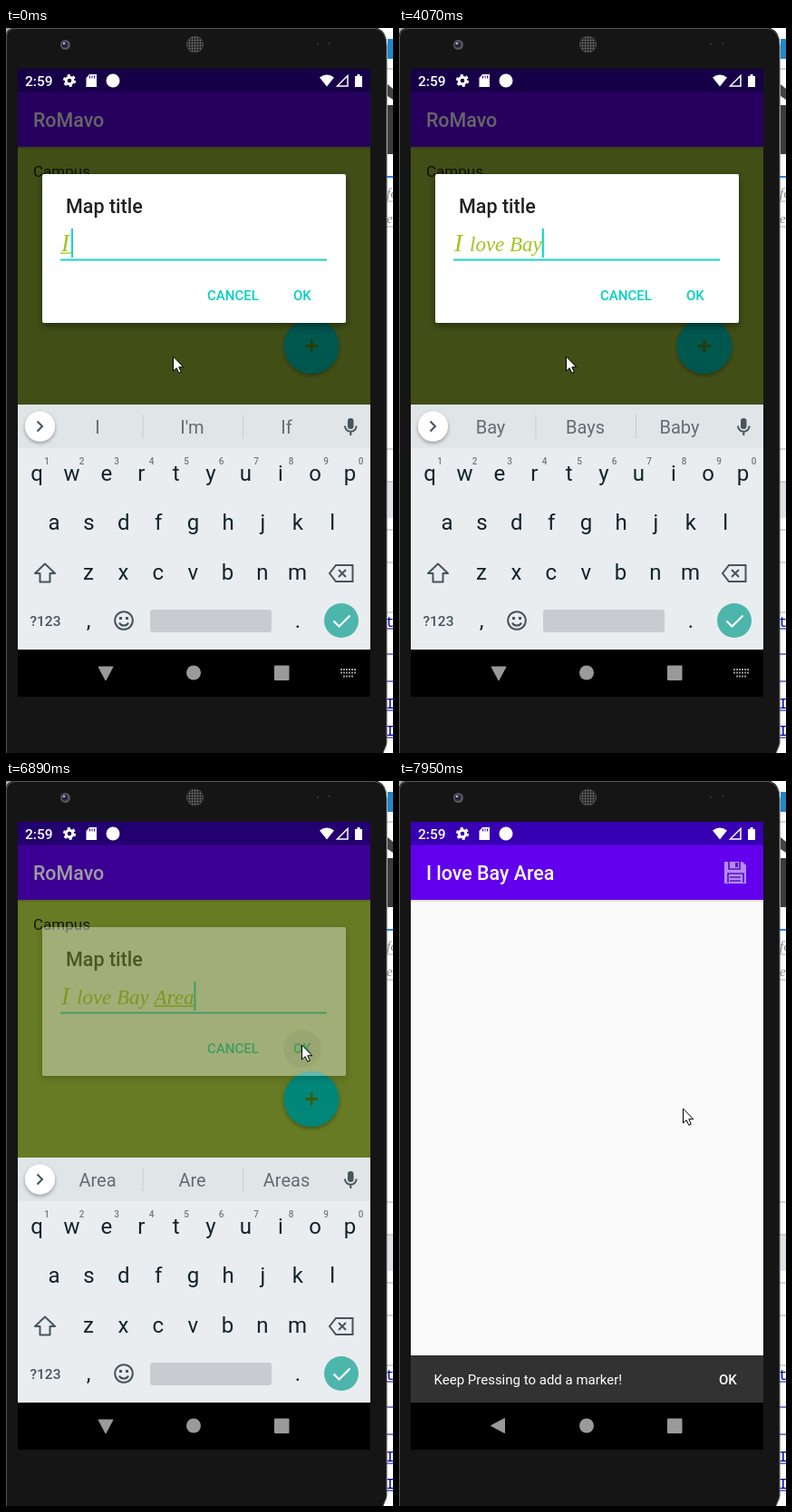
An HTML page that plays this animation: 427x799 px, repeating every 8 s.

```html
<!DOCTYPE html>
<html lang="en">
<head>
<meta charset="utf-8">
<style>
  html, body { margin: 0; width: 100%; height: 100%; overflow: hidden; background: #fff; }
  svg { display: block; font-family: Roboto, sans-serif; }
  .med { font-weight: 500; }
  .bar { font-size: 21.4px; font-weight: 500; fill: #fff; }
  .btn { font-size: 15px; font-weight: 500; }
  .mid { text-anchor: middle; }
  .key { font-size: 24px; fill: #13232b; text-anchor: middle; }
  .num { font-size: 10px; font-weight: 500; fill: #727b80; text-anchor: middle; }
  .sug { font-size: 20px; fill: #626c72; text-anchor: middle; }
  .script { font: italic 23px "Liberation Serif", serif; fill: #a0c51e; }
  .line { fill: none; stroke: #46545c; stroke-width: 2; }
</style>
</head>
<body>
<svg width="427" height="799" viewBox="0 0 427 799">
  <defs>
    <pattern id="mesh" width="3" height="3" patternUnits="userSpaceOnUse">
      <rect width="3" height="3" fill="#222"/><circle cx="1.5" cy="1.5" r="1" fill="#777"/>
    </pattern>
    <filter id="soft" x="-20%" y="-20%" width="140%" height="150%">
      <feDropShadow dx="0" dy="3" stdDeviation="4" flood-opacity=".45"/>
    </filter>
    <filter id="lift" x="-20%" y="-20%" width="140%" height="150%">
      <feDropShadow dx="0" dy="2" stdDeviation="2" flood-opacity=".35"/>
    </filter>
    <clipPath id="screen"><rect x="13" y="45" width="389" height="640"/></clipPath>
  </defs>

  <!-- window behind the phone -->
  <g id="desk">
    <rect x="421" y="12" width="6" height="22" fill="#2088c8"/>
    <path d="M421 62l6 5v12l-6-4z" fill="#444"/>
    <rect x="421" y="85" width="6" height="54" fill="#3b3b3d"/>
    <path d="M420 164h7" stroke="#2c86e8" stroke-width="2"/>
    <rect x="421" y="500" width="6" height="40" fill="#dfe2e8"/>
    <path d="M420 45h7m-7 146h7m-7 28h7m-7 245h7m-7 36h7m-7 53h7m-7 36h7m-7 55h7" stroke="#aaa"/>
    <g font-family="Liberation Serif, serif" font-style="italic" font-size="15" fill="#888">
      <text x="420" y="187">fe</text><text x="420" y="215">er</text>
    </g>
    <g font-family="Liberation Mono, monospace" font-size="16" fill="#00a">
      <text x="419" y="660">t</text><text x="419" y="750">I</text><text x="419" y="780">I</text>
    </g>
    <path d="M420 662h7m-7 28h7m-7 30h7m-7 32h7m-7 30h7" stroke="#00a"/>
  </g>

  <!-- phone body -->
  <path d="M0 0H410Q420 4 420 18V790L416 799H0z" fill="#151515"/>
  <path d="M.5 799V10Q1 .5 12 .5H407Q420 3 420 20V788L416 799" fill="none" stroke="#555"/>
  <path d="M0 0h7Q0 2 0 9z" fill="#aaa"/>
  <circle cx="65.500" cy="18.500" r="5.500" fill="#55555b"/>
  <circle cx="65" cy="18.500" r="3.200" fill="#26243c"/><circle cx="64" cy="17" r="1.300" fill="#b9b9cc"/>
  <circle cx="208.500" cy="18" r="9.500" fill="url(#mesh)"/>
  <path d="M343 18h2m11-1h2" stroke="#333" stroke-width="2"/>
  <rect x="13" y="45" width="389" height="692"/>

  <!-- list screen -->
  <g clip-path="url(#screen)">
    <rect x="13" y="45" width="389" height="640" fill="#fafafa"/>
    <rect x="13" y="131" width="389" height="284" fill="#a4c639"/>
    <rect x="13" y="131" width="389" height="2" opacity=".12"/>
    <rect x="13" y="45" width="389" height="26" fill="#3700b3"/>
    <rect x="13" y="70.500" width="389" height="60.500" fill="#6200ee"/>
    <text class="bar" x="30" y="109">RoMavo</text>
    <text x="30" y="163.500" font-size="17" fill="#20260c">Campus</text>
    <g filter="url(#lift)"><circle cx="337" cy="350.500" r="30.500" fill="#03dac5"/></g>
    <path d="M330 350.500h14m-7-7v14" stroke="#5c941c" stroke-width="3"/>
    <rect id="scrim" x="13" y="45" width="389" height="640"/>

    <g id="dialog">
      <rect x="40" y="161" width="335" height="164" rx="2" fill="#fff" filter="url(#soft)"/>
      <circle id="ripple" cx="327" cy="295" r="21" opacity=".08"/>
      <text class="med" x="66" y="203.500" font-size="21.500" fill="#212121">Map title</text>
      <text class="script" id="first" x="61" y="246" style="font-size:27px">I</text>
      <text class="script" id="rest" x="78" y="245.500"></text>
      <path id="under" stroke="#a0c51e" stroke-width="1.300"/>
      <path d="M60 255.500H354" stroke="#1fcfc4" stroke-width="2"/>
      <rect id="caret" y="221" width="2" height="32" fill="#03dac5"/>
      <g class="btn" fill="#03d0c0"><text x="222" y="300">CANCEL</text><text x="317" y="300">OK</text></g>
    </g>

    <g id="board">
      <rect x="13" y="415" width="389" height="270" fill="#e9edf0"/>
      <rect x="13" y="415" width="389" height="48" fill="#e0e5e8"/>
      <path d="M151 426v26m110.500-26v26" stroke="#c6cccf"/>
      <circle cx="37.500" cy="439" r="16.500" fill="#fff" filter="url(#lift)"/>
      <path class="line" d="M34.500 433.500l5.500 5.500-5.500 5.500"/>
      <rect x="377" y="430" width="6.500" height="12" rx="3.200" fill="#46545c"/>
      <path class="line" d="M374 438.500a6.300 6.300 0 0 0 12.600 0M380.300 445v4" stroke-width="1.700"/>
      <g id="keys"></g>
      <path id="shift" class="line" d="M43 590.500L54 601h-5.500v9.500h-11V601H32z" stroke-linejoin="round"/>
      <path class="line" d="M364 592h18.500v18H364l-7-9zM367 597l8 8m0-8l-8 8"/>
      <text class="med mid" x="43.500" y="659" font-size="15.500" fill="#46545c">?123</text>
      <text class="key" x="91" y="661">,</text>
      <text class="key" x="322" y="661">.</text>
      <circle class="line" cx="130" cy="653" r="9.800"/>
      <path class="line" d="M125 655.500a5.300 4.500 0 0 0 10 0"/>
      <path d="M125 650.500h3m4 0h3" stroke="#46545c" stroke-width="3"/>
      <rect x="159" y="641" width="134" height="25" rx="3" fill="#c8ccd1"/>
      <circle cx="370" cy="653" r="19" fill="#4db6ac"/>
      <path d="M361.500 653.500l6 6 12-12" fill="none" stroke="#fff" stroke-width="2.200"/>
    </g>
  </g>

  <!-- map screen -->
  <g id="map">
    <rect x="13" y="45" width="389" height="26" fill="#3700b3"/>
    <rect x="13" y="131" width="389" height="554" fill="#fafafa"/>
    <rect x="13" y="131" width="389" height="2" opacity=".1"/>
    <rect x="13" y="70.500" width="389" height="60.500" fill="#6200ee"/>
    <text class="bar" x="30" y="109">I love Bay Area</text>
    <path d="M359 89h20l4 4v20h-24z" fill="#b58cf0"/>
    <path d="M364 89v8h12v-8m-13 23v-10h17v10m-15-6h12m-12 4h12" fill="none" stroke="#5a10c8" stroke-width="1.700"/>
    <rect x="371" y="90" width="3" height="5" fill="#5a10c8"/>
    <g id="snack">
      <rect x="13" y="633" width="389" height="52" fill="#323232"/>
      <text x="38.500" y="665" font-size="15" fill="#fff">Keep Pressing to add a marker!</text>
      <text class="btn" x="353" y="665" fill="#fff">OK</text>
    </g>
  </g>

  <!-- system bars -->
  <g fill="#fff">
    <text class="med" x="21" y="64" font-size="15.500">2:59</text>
    <circle cx="70" cy="58" r="3.800" fill="none" stroke="#fff" stroke-width="3"/>
    <circle cx="70" cy="58" r="6" fill="none" stroke="#fff" stroke-width="2.200" stroke-dasharray="3.140"/>
    <path d="M92 51h8v14H88.500V55zM346 54.500q8-6 16 0l-8 10zM385 53h2.500v-2h3v2h2.500v12h-8z"/>
    <path d="M92.500 52.500v3m2.500-3v3m2.500-3v3" stroke="#3700b3"/>
    <circle cx="118" cy="58" r="7.500"/>
    <path d="M377 52.500V64h-11.500z" fill="none" stroke="#fff" stroke-width="1.500"/>
  </g>
  <g fill="#9a9a9a">
    <path id="back" d="M101.500 710.500l15-8v16z" stroke="#9a9a9a" stroke-linejoin="round"/>
    <circle cx="207" cy="710.500" r="8"/>
    <rect x="296" y="702.500" width="16.500" height="16.500" rx="1"/>
    <path id="ime" d="M369 707h17m-17 3.500h17m-14 4h11" fill="none" stroke="#9a9a9a" stroke-width="2" stroke-dasharray="2 1"/>
  </g>
  <path id="mouse" d="M.5 0V16l3.700-3.300 2.600 5.600 2.500-1.100-2.500-5.500h5z" fill="#fff" stroke="#000"/>
</svg>

<script>
const LOOP = 8000;
const $ = id => document.getElementById(id);
const typed = (done, word, tips) => ({ done, word, tips, caret: 1 });

// Each row changes part of the state from its time on.
const steps = [
  [0, { ...typed('', 'I', "I I'm If"), mouse: [184, 362], caps: 0, scrim: .6, dialog: 1,
        ripple: 0, slide: 0, turn: -90, ime: 1, map: 0, rise: 0, snack: 0 }],
  [250, typed('I ', '', 'am have will')],
  [620, typed('I ', 'l', 'l love like')],
  [870, typed('I ', 'lo', 'love lot look')],
  [990, typed('I ', 'lov', 'love lover loved')],
  [1140, typed('I ', 'love', 'love loved loves')],
  [1260, typed('I love ', '', 'it you that')],
  [1820, { caret: 0 }],
  [2350, { caret: 1 }],
  [2880, { caret: 0 }],
  [3000, typed('I love ', 'b', 'b but both')],
  [3250, typed('I love ', 'ba', 'ba bad back')],
  [3530, typed('I love ', 'bay', 'bay baby back')],
  [3690, typed('I love Bay ', '', 'and is area')],
  [3950, typed('I love Bay ', 'a', 'a and area')],
  [4070, typed('I love Bay', '', 'Bay Bays Baby')],
  [4190, typed('I love Bay ', '', 'and is area')],
  [4560, { caps: 1, tips: 'And Is Area' }],
  [4680, { ...typed('I love Bay ', 'A', 'A And Area'), caps: 0 }],
  [4830, typed('I love Bay ', 'Ar', 'Are Art Area')],
  [4950, typed('I love Bay ', 'Are', "Are Area Aren't")],
  [5390, { caret: 0 }],
  [5530, typed('I love Bay ', 'Area', 'Area Are Areas')],
  [5930, { mouse: [187, 361] }],
  [6080, { mouse: [238, 331], caret: 0 }],
  [6230, { mouse: [368, 258] }],
  [6380, { mouse: [350, 274] }],
  [6500, { mouse: [334, 290] }],
  [6620, { mouse: [329, 294], caret: 1 }],
  [6740, { mouse: [328, 293] }],
  [6890, { mouse: [326, 291], scrim: .38, dialog: .39, ripple: .08, ime: 0 }],
  [7010, { mouse: [322, 282], scrim: 0, dialog: 0, slide: 90, turn: -45 }],
  [7160, { mouse: [310, 315], slide: 270, turn: 0 }],
  [7440, { mouse: [303, 331] }],
  [7560, { mouse: [301, 335] }],
  [7680, { mouse: [304, 345], map: .4, rise: 15 }],
  [7800, { mouse: [310, 356], map: .95, rise: 5 }],
  [7950, { mouse: [313, 361], map: 1, rise: 0, snack: 1 }]
];

const label = (cls, x, y, text) => {
  const el = document.createElementNS('http://www.w3.org/2000/svg', 'text');
  el.setAttribute('class', cls);
  el.setAttribute('x', x);
  el.setAttribute('y', y);
  el.textContent = text;
  $('keys').append(el);
  return el;
};
const keyRow = (letters, x, y) => [...letters].map((c, i) => label('key', x + 38.4 * i, y, c));
const letters = [
  ...keyRow('qwertyuiop', 34, 498.5),
  ...keyRow('asdfghjkl', 53, 553),
  ...keyRow('zxcvbnm', 91, 608)
];
[...'1234567890'].forEach((c, i) => label('num', 45 + 38.5 * i, 481, c));
const tips = [101, 205.5, 309.5].map(x => label('sug', x, 447, ''));

const set = (id, name, value) => $(id).setAttribute(name, value);
const endOf = text => {
  if (text.length < 2) return text ? 72 : 60;
  const tail = text.slice(2);
  $('rest').textContent = tail.replace(/ /g, '\u00a0');
  return 78 + (tail ? $('rest').getComputedTextLength() : 0);
};

function draw(t) {
  const s = Object.assign({}, ...steps.filter(row => row[0] <= t).map(row => row[1]));
  const start = endOf(s.done), end = endOf(s.done + s.word);
  if ((s.done + s.word).length < 2) $('rest').textContent = '';
  set('under', 'd', s.word ? `M${start} 248H${end}` : '');
  set('caret', 'x', end);
  set('caret', 'opacity', s.caret);
  s.tips.split(' ').forEach((word, i) => tips[i].textContent = word);
  letters.forEach(el => {
    const c = el.textContent;
    el.textContent = s.caps ? c.toUpperCase() : c.toLowerCase();
  });
  $('shift').style.fill = s.caps ? '#46545c' : 'none';
  for (const id of ['scrim', 'dialog', 'ripple', 'ime', 'map', 'snack']) set(id, 'opacity', s[id]);
  set('board', 'transform', `translate(0 ${s.slide})`);
  set('map', 'transform', `translate(0 ${s.rise})`);
  set('back', 'transform', `rotate(${s.turn} 110 710.5)`);
  set('mouse', 'transform', `translate(${s.mouse})`);
}

const begin = performance.now();
(function tick() {
  draw((performance.now() - begin) % LOOP);
  requestAnimationFrame(tick);
})();
</script>
</body>
</html>
```
